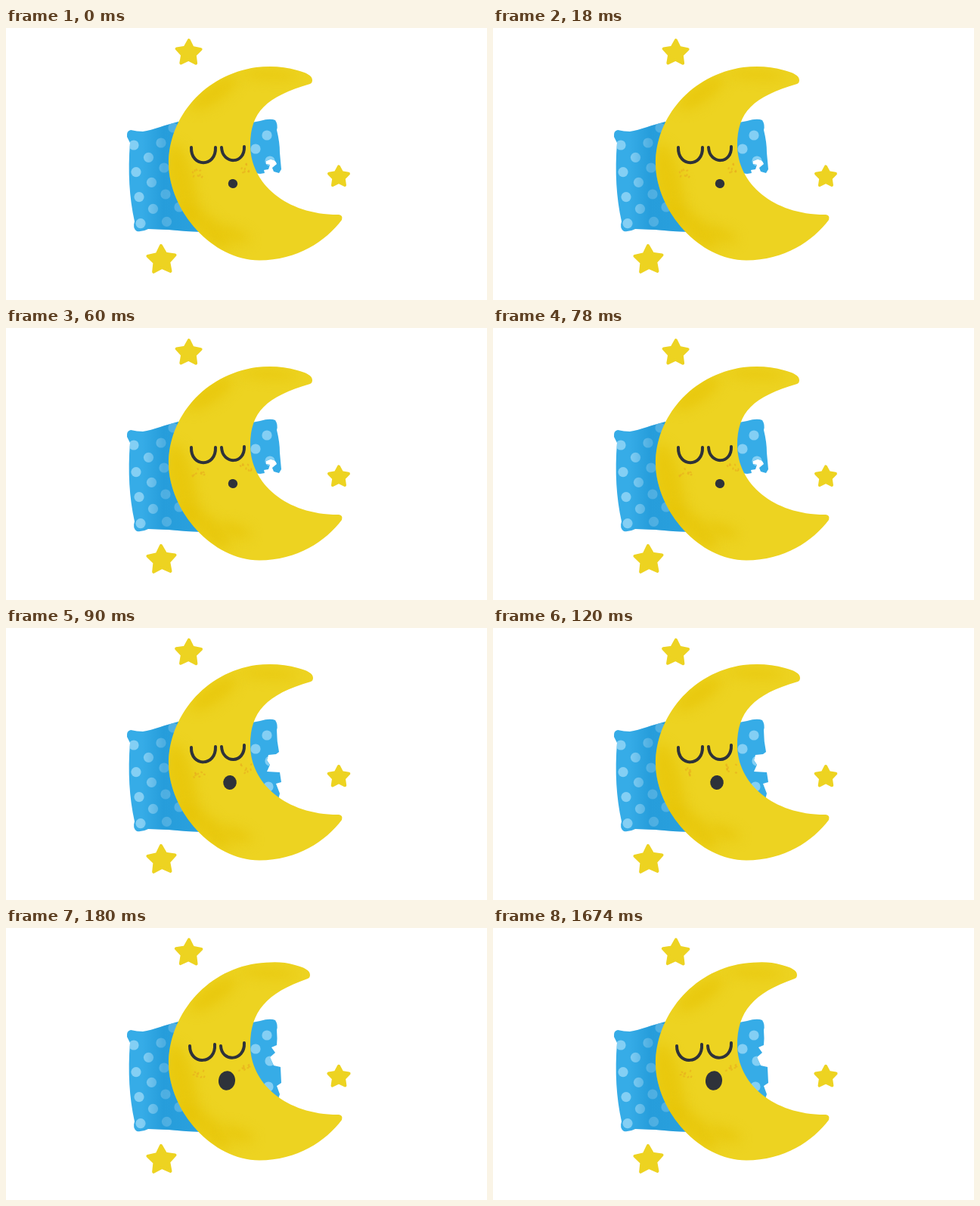
An HTML page with a canvas that plays this animation: 636x360 px, repeating every 2.67 s.

```html
<!DOCTYPE html>
<html lang="en">
<head>
<meta charset="utf-8">
<title>Sleepy moon</title>
<style>
html, body { margin: 0; width: 100%; height: 100%; overflow: hidden; background: #fff; }
canvas { display: block; width: 636px; height: 360px; }
</style>
</head>
<body>
<canvas id="stage" width="636" height="360"></canvas>
<script>
const ctx = document.getElementById('stage').getContext('2d');
const LOOP = 2670, STEP = 30, LAST = 6;
const INK = '#2e323a', YELLOW = '#edd321';

const leftPillow = new Path2D(
  'M160 144Q159 136 165 135Q173 137 181 137C195 135 211 128 228 124L260 270' +
  'L238 269L215 267L188 266Q181 270 173 269Q167 265 170 256C163 225 161 190 164 152Z');

// Each pose: crescent tip, rise of the top edge, eye curves, mouth, pillow remnant, star size
const poses = [
  { tip: [405, 69], top: 52, eyes: ['M245 158C244 185 278 185 277 158', 'M285 158C286 181 316 181 315 157'],
    mouth: [300, 206, 6.2, 6], star: 1,
    pillow: 'M315 127L336 123Q349 119 356 122Q360 128 358 135Q362 151 362 165L364 187L361 192L354 190L352 185L358 180Q356 173 349 174L344 176L344 180L349 181L347 187L341 188L342 192L336 193L315 190Z' },
  { tip: [406, 66], top: 49, eyes: ['M245 158C244 184 278 184 277 157', 'M285 157C286 180 316 180 315 155'],
    mouth: [296, 204.5, 8.8, 9.5], star: 1.03,
    pillow: 'M315 127L336 123Q349 119 356 122Q360 128 358 135Q358 150 361 164L357 167L347 168L345 175L349 181L345 190L362 191L364 204L357 206L362 219L360 227L320 220Z' },
  { tip: [402, 62], top: 47, eyes: ['M243 156C243 182 278 181 276 154', 'M284 156C285 178 316 177 315 152'],
    mouth: [292, 202, 11, 12.8], star: 1.05,
    pillow: 'M315 127L336 123Q349 119 356 122Q360 128 358 135Q359 146 358 155L351 158L356 165L349 171L354 182L363 184L364 205L358 209L362 220L360 226L320 220Z' }
];

function moonPath({ tip: [x, y], top }) {
  return new Path2D(
    `M${x} ${y}C${x} ${y - 6} ${x - 8} ${y - 10} ${x - 20} ${y - 13}` +
    `C${x - 37} ${y - 18} 350 ${top - 2} 331 ${top}C262 ${top + 10} 215 118 215 180` +
    'C216 242 273 307.5 335 307.5C385 307.5 423 282 444 254Q446 248 440 247' +
    `C371 247.5 323 206 323 155C323 111 344 ${top + 39} ${x - 3} ${y + 5}Q${x} ${y + 4} ${x} ${y}Z`);
}

function random(seed) {
  return () => (seed = seed * 16807 % 2147483647) / 2147483647;
}

function oval(x, y, rx, ry, color, turn = 0) {
  ctx.fillStyle = color;
  ctx.beginPath();
  ctx.ellipse(x, y, rx, ry, turn, 0, Math.PI * 2);
  ctx.fill();
}

function star(x, y, r, turn) {
  ctx.beginPath();
  for (let i = 0; i < 10; i++) {
    const a = turn + i * Math.PI / 5, d = i % 2 ? r * 0.52 : r;
    ctx.lineTo(x + d * Math.sin(a), y - d * Math.cos(a));
  }
  ctx.closePath();
  ctx.fillStyle = ctx.strokeStyle = YELLOW;
  ctx.lineWidth = 4;
  ctx.fill();
  ctx.stroke();
}

function inside(path, paint) {
  ctx.save();
  ctx.clip(path);
  paint();
  ctx.restore();
}

function dot(x, y) {
  oval(x, y, 6.6, 6.6, '#84cff4');
}

function pillow(pose) {
  const right = new Path2D(pose.pillow);
  ctx.fillStyle = '#36ace7';
  ctx.fill(leftPillow);
  ctx.fill(right);

  inside(leftPillow, () => {
    dot(169, 155);
    // Diagonal rows running down to the left
    for (const [x, y, count] of [[221, 132, 1], [205, 152, 3], [209, 185, 3], [211, 220, 3], [229, 237, 2]])
      for (let i = 0; i < count; i++) dot(x - 16.5 * i, y + 19.3 * i);
    const fold = ctx.createLinearGradient(180, 0, 250, 0);
    fold.addColorStop(0, 'rgba(22,142,207,0)');
    fold.addColorStop(0.4, 'rgba(22,142,207,.5)');
    fold.addColorStop(1, 'rgba(22,142,207,.4)');
    ctx.fillStyle = fold;
    ctx.fillRect(180, 120, 90, 155);
  });
  inside(right, () => {
    for (const [x, y] of [[345, 142], [330, 160], [349, 176], [347, 210]]) dot(x, y);
  });
}

// Soft brush patches and freckles shift a little at every step
function texture(rand) {
  const wobble = n => (rand() - 0.5) * n;
  const shade = 'rgba(230,196,4,.65)';
  ctx.filter = 'blur(8px)';
  oval(232, 208, 18, 56, shade, -0.2);
  oval(264, 262, 42, 14, shade, 0.75);
  oval(306 + wobble(14), 270 + wobble(8), 22, 8, shade, 0.35);
  oval(272 + wobble(8), 88 + wobble(6), 36, 12, shade, -0.6);
  oval(340 + wobble(20), 60 + wobble(6), 38, 6, shade, 0.05);
  ctx.filter = 'none';
  for (const [x, y] of [[254, 191], [316, 186]])
    for (let i = 0; i < 8; i++)
      oval(x + wobble(17), y + wobble(13), 1.7, 1.2, 'rgba(231,169,30,.55)', wobble(3));
}

function draw(step) {
  const pose = poses[step < 3 ? 0 : step < 5 ? 1 : 2];
  ctx.fillStyle = '#fff';
  ctx.fillRect(0, 0, 636, 360);
  ctx.lineCap = ctx.lineJoin = 'round';
  pillow(pose);

  const moon = moonPath(pose);
  ctx.fillStyle = YELLOW;
  ctx.fill(moon);
  inside(moon, () => texture(random(7919 * (step + 3))));

  ctx.strokeStyle = INK;
  ctx.lineWidth = 4;
  pose.eyes.forEach(eye => ctx.stroke(new Path2D(eye)));
  oval(...pose.mouth, INK, 0.1);

  star(241.5, 33, 16.8 * pose.star, 0.02);
  star(440, 197, 13.6 * pose.star, 0);
  star(205.7, 307, 19, -0.04);
}

let shown = -1;
function tick() {
  const step = Math.min(LAST, Math.floor(performance.now() % LOOP / STEP));
  if (step !== shown) draw(shown = step);
  requestAnimationFrame(tick);
}
tick();
</script>
</body>
</html>
```
